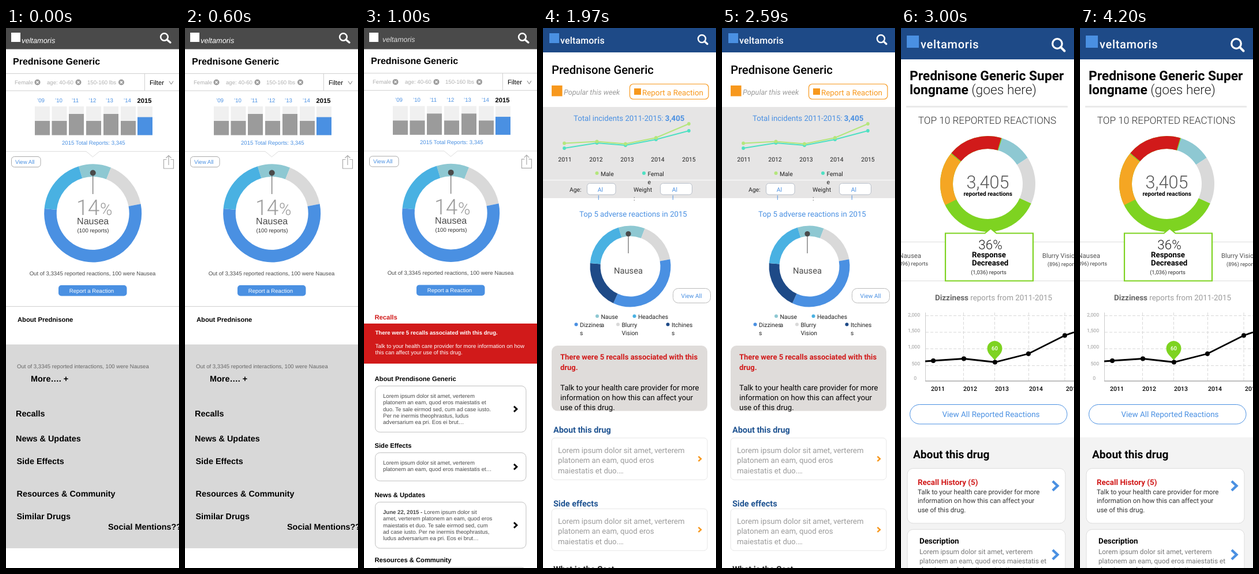
Animation of 300 by 930 pixels, one loop 5000 ms. Source, as an HTML page:

```html
<!DOCTYPE html>
<html lang="en">
<head>
<meta charset="utf-8">
<title>Drug report screens</title>
<style>
html, body { margin: 0; width: 100%; height: 100%; overflow: hidden; background: #fff; }
svg { display: block; width: 100vw; height: 100vh; }
text { text-rendering: geometricPrecision; white-space: pre; }
.arial { font-family: "Liberation Sans", Arial, sans-serif; }
.roboto { font-family: Roboto, sans-serif; }
</style>
</head>
<body>
<svg id="stage" viewBox="0 0 300 930"></svg>
<script>
const BLUE = '#4a90e2', SKY = '#49b1e2', TEAL = '#8ec8d2', LIGHT = '#d9d9d9', NAVY = '#1e4a87',
      GREY = '#9b9b9b', DARK = '#4a4a4a', RED = '#d11a1a', ORANGE = '#f7981d', GREEN = '#7ed321',
      LIME = '#b4e67c', MINT = '#4fe0c3';
const BRAND = 'veltamoris';

const attrs = o => Object.entries(o).map(([k, v]) => ` ${k}="${v}"`).join('');
const el = (name, o, body = '') => `<${name}${attrs(o)}>${body}</${name}>`;
const text = (x, y, s, size, fill = '#000', weight = 400, o = {}) =>
  el('text', { x, y, 'font-size': size, fill, 'font-weight': weight, ...o }, s.replace(/&/g, '&amp;'));
const mid = { 'text-anchor': 'middle' }, end = { 'text-anchor': 'end' };
const span = (s, weight, fill) => el('tspan', { 'font-weight': weight, fill }, s);
const lines = (x, ys, rows, size, fill, weight) =>
  rows.map((s, i) => text(x, ys[i], s, size, fill, weight)).join('');
// box given by its edges
const rect = (x, y, x2, y2, fill, rx = 0, stroke = 'none', sw = 1) =>
  el('rect', { x, y, width: x2 - x, height: y2 - y, fill, rx, stroke, 'stroke-width': sw });
const path = (d, stroke, sw = 1, o = {}) =>
  el('path', { d, stroke, 'stroke-width': sw, fill: 'none', ...o });
const dot = (cx, cy, r, fill) => el('circle', { cx, cy, r, fill });
const chevron = (x, y, w, h, color, sw) => path(`M${x} ${y - h}l${w} ${h}l${-w} ${h}`, color, sw);
const search = (x, y, r, x2, y2, sw) =>
  el('circle', { cx: x, cy: y, r, fill: 'none', stroke: '#fff', 'stroke-width': sw }) +
  path(`M${x + r * .7} ${y + r * .7}L${x2} ${y2}`, '#fff', sw + .8, { 'stroke-linecap': 'round' });

// parts: [start, end, colour], degrees clockwise from the top
function donut(cx, cy, outer, inner, parts) {
  const r = (outer + inner) / 2;
  const at = a => {
    const t = a * Math.PI / 180;
    return `${(cx + r * Math.sin(t)).toFixed(2)} ${(cy - r * Math.cos(t)).toFixed(2)}`;
  };
  return parts.map(([a, b, color]) =>
    path(`M${at(a)}A${r} ${r} 0 ${b - a > 180 ? 1 : 0} 1 ${at(b)}`, color, outer - inner)).join('');
}
const needle = (x, y, y2, r) => path(`M${x} ${y}V${y2}`, '#666', 1.2) + dot(x, y, r, DARK);

function darkHeader(x, y, size, fill) {
  return rect(0, 0, 300, 36.5, DARK) + rect(9, 8, 25, 24, '#fff') +
    text(x, y, BRAND, size, fill, 400, { 'font-style': 'italic' }) + search(274.5, 15.5, 6.3, 285, 25, 2.6);
}

// upper part common to the two grey screens
function summary() {
  const tag = (x, s, cx) => text(x, 97, s, 9.6, '#b0b0b0') + dot(cx, 93.5, 5, GREY) +
    path(`M${cx - 2} 91.5l4 4m0-4l-4 4`, '#fff', 1.3);
  const tops = [160, 160, 148, 160, 148, 160, 153.5];
  const lefts = [50, 79.5, 109, 139, 169, 199, 228];
  const labels = [60.5, 91.5, 120, 150, 179.5, 210.5];
  return text(12, 63, 'Prednisone Generic', 16, '#000', 700) +
    path('M0 78.5H300M0 108H300M240.5 78.5V108', '#d0d0d0') +
    tag(15, 'Female', 54.5) + tag(71, 'age: 40-60', 125.5) + tag(141, '150-160 lbs', 200) +
    text(249, 98, 'Filter', 11.2) + path('M283 91.5l3.5 5.5l3.5-5.5', '#777') +
    labels.map((x, i) => text(x, 128, '\u2019' + ['09', 10, 11, 12, 13, 14][i], 9.6, BLUE, 400, mid)).join('') +
    text(240, 129, '2015', 11.2, '#000', 700, mid) +
    lefts.map((x, i) => rect(x, 135, x + 26, 184.5, '#f0f0f0') +
      rect(x, tops[i], x + 26, 184.5, i < 6 ? GREY : BLUE)).join('') +
    text(97, 201, '2015 Total Reports: 3,345', 9.6, BLUE) +
    path('M0 212.5H139L150.5 222L162 212.5H300', '#ddd') +
    rect(9.5, 221.5, 60, 239.5, '#fff', 5, '#aaa') + text(16, 234, 'View All', 9.6, BLUE) +
    path('M278.5 226.5H273.5V242H290.5V226.5H285.5M282 236V219.5M277.5 224L282 219.5L286.5 224', '#aaa', 1.2) +
    donut(150.7, 319, 84.5, 63, [[-17, 21.8, TEAL], [21.8, 79, LIGHT], [79, 275.5, BLUE], [275.5, 343, SKY]]) +
    needle(150.7, 249.5, 286, 5) +
    text(122, 322, '14', 37, GREY, 300, { class: 'roboto', 'letter-spacing': -.8 }) +
    text(163, 322, '%', 29, GREY, 300, { class: 'roboto' }) +
    text(150.7, 338, 'Nausea', 16, DARK, 400, mid) +
    text(151, 351.5, '(100 reports)', 9.6, '#333', 400, mid) +
    text(150, 425.5, 'Out of 3,3345 reported reactions, 100 were Nausea', 9.6, DARK, 400, mid) +
    rect(91, 443, 209.5, 461.5, BLUE, 5) + text(148.5, 455.5, 'Report a Reaction', 9.6, '#fff', 400, mid);
}

function wireframe() {
  const heads = [[43, 609, 'More\u2026. +'], [17, 669, 'Recalls'], [17, 712, 'News & Updates'],
    [18.5, 751, 'Side Effects'], [18.5, 807, 'Resources & Community'], [18.5, 846, 'Similar Drugs'],
    [177, 863.5, 'Social Mentions??']];
  return darkHeader(27, 26, 12.8, '#fff') + summary() + path('M0 479.5H300', '#d0d0d0') +
    text(20, 506, 'About Prednisone', 11.2, '#000', 700) + rect(0, 545, 300, 896, '#d8d8d8') +
    text(19, 586, 'Out of 3,3345 reported interactions, 100 were Nausea', 9.6, '#666') +
    heads.map(([x, y, s]) => text(x, y, s, 14.4, '#000', 700)).join('');
}

function recallScreen() {
  const head = (y, s, fill) => text(18.5, y, s, 11.2, fill, 700);
  const card = (y, y2) => rect(19.5, y, 281, y2, '#fff', 8, '#c0c0c0') +
    (y < 920 ? chevron(260, (y + y2) / 2, 5, 4.6, '#000', 2.8) : '');
  const copy = (y, rows) => lines(33, rows.map((_, i) => y + i * 11.3), rows, 9.6, DARK);
  const date = text(33, 837, '', 9.6, DARK).replace('</text>',
    span('June 22, 2015 - ', 700, DARK) + 'Lorem ipsum dolor sit</text>');
  return darkHeader(32, 24, 12.4, '#ddd') + el('g', { transform: 'translate(0 -.6)' }, summary()) +
    head(502, 'Recalls', RED) + rect(0, 509, 300, 578, RED) +
    text(19.5, 528, 'There were 5 recalls associated with this drug.', 9.6, '#fff', 700) +
    lines(19.5, [550.5, 562], ['Talk to your health care provider for more information on how',
      'this can affect your use of this drug.'], 9.6, '#fff') +
    head(608, 'About Prendisone Generic') + card(616.5, 696) +
    copy(637, ['Lorem ipsum dolor sit amet, verterem', 'platonem an eam, quod eros maiestatis et',
      'duo. Te sale eirmod sed, cum ad case iusto.', 'Per ne inermis theophrastus, ludus',
      'adversarium ea pri. Eos ei brut\u2026']) +
    head(723, 'Side Effects') + card(731.5, 780) +
    copy(751.5, ['Lorem ipsum dolor sit amet, verterem', 'platonem an eam, quod eros maiestatis et\u2026']) +
    head(808, 'News & Updates') + card(816.5, 896) + date +
    copy(848.3, ['amet, verterem platonem an eam, quod eros', 'maiestatis et duo. Te sale eirmod sed, cum',
      'ad case iusto. Per ne inermis theophrastus,', 'ludus adversarium ea pri. Eos ei brut\u2026']) +
    head(920, 'Resources & Community') + card(929, 990);
}

function blueHeader(h, mark, x, y, size, spacing) {
  return rect(0, 0, 300, h, NAVY) + mark +
    text(x, y, BRAND, size, '#fff', 500, { 'letter-spacing': spacing });
}

function trendScreen() {
  const xs = [37, 93.5, 143, 196, 253];
  const series = (ys, color) => path('M' + xs.map((x, i) => x + ' ' + ys[i]).join('L'), color, 2) +
    xs.map((x, i) => dot(x, ys[i], 2.9, color)).join('');
  const key = (x, y, color, rows) => dot(x, y, 3, color) + lines(x + 6.4, [y + 4.7, y + 18.9], rows, 10.4, '#222');
  const pick = (x, x2, tx) => rect(x, 267.5, x2, 287, '#fff', 5, '#b8bfc9') +
    text(tx, 282, 'Al', 10.4, BLUE) + text(tx + .2, 296, 'l', 10.4, BLUE);
  const card = (y, title) => text(18, y - 9 + (y > 800 ? 5 : 0), title, 14.4, '#1f5391', 700) +
    rect(15, y, 285, y + 72, '#fff', 6, '#e6e6e6') +
    lines(26, [y + 26, y + 43.4, y + 60.8], ['Lorem ipsum dolor sit amet, verterem',
      'platonem an eam, quod eros', 'maiestatis et duo.\u2026'], 13.2, GREY) +
    chevron(269.5, y + 36, 4.5, 4.2, ORANGE, 2.5);
  return blueHeader(42, rect(11, 9, 28, 26, BLUE), 30, 27, 16, .15) + search(275.5, 18.5, 6.5, 285, 27.5, 2.5) +
    text(15, 78.5, 'Prednisone Generic', 20.2, '#000', 500) + rect(15, 99, 33.5, 117.5, ORANGE) +
    text(36, 115, 'Popular this week', 12.7, GREY, 400, { 'font-style': 'italic' }) +
    rect(150.5, 96.5, 287, 122.5, '#fff', 6, ORANGE, 1.2) + rect(158, 104, 170, 115, ORANGE) +
    text(172, 116, 'Report a Reaction', 13.4, ORANGE) +
    rect(0, 136, 300, 293, '#e6e5e5') + path('M0 262H300', '#fff', 1.2) +
    text(53, 160, '', 13.2, BLUE).replace('</text>', 'Total incidents 2011-2015: ' + span('3,405', 700, BLUE) + '</text>') +
    series([207, 198, 202, 192, 177], MINT) + series([198.5, 195.5, 199.5, 189, 165], LIME) +
    [38, 92, 146, 199, 253].map((x, i) => text(x, 230, String(2011 + i), 10.4, '#222', 400, mid)).join('') +
    key(93.5, 250, LIME, ['Male']) + key(175, 250, MINT, ['Femal', 'e']) +
    text(46, 281.5, 'Age:', 10.4, '#222') + pick(76.5, 126, 94.7) +
    lines(157, [282, 296.5], ['Weight', ':'], 10.4, '#222') + pick(203.5, 258.5, 223.7) +
    text(63, 324.5, 'Top 5 adverse reactions in 2015', 13.2, BLUE) +
    donut(151.5, 410.5, 70, 52, [[-17, 21, TEAL], [21, 80, LIGHT], [80, 205, BLUE], [205, 274.5, NAVY], [274.5, 343, SKY]]) +
    needle(148, 354.5, 388, 4.6) + text(148, 423, 'Nausea', 14.7, DARK, 400, mid) +
    rect(225.5, 448.5, 290.5, 473.5, '#fff', 9, '#bbb') + text(257.5, 465, 'View All', 10.2, BLUE, 400, mid) +
    key(94, 496.3, TEAL, ['Nause', 'a']) + key(158.5, 496.3, SKY, ['Headaches']) +
    key(57.5, 510.5, BLUE, ['Dizzines', 's']) + key(130, 510.5, LIGHT, ['Blurry', 'Vision']) +
    key(216.5, 510.5, NAVY, ['Itchines', 's']) +
    rect(15, 547, 285, 659.5, '#dfdcda', 10) +
    lines(30, [571, 588.5], ['There were 5 recalls associated with this', 'drug.'], 13, RED, 700) +
    lines(30, [623.5, 641, 658], ['Talk to your health care provider for more',
      'information on how this can affect your', 'use of this drug.'], 13.2, '#000') +
    card(706, 'About this drug') + card(828, 'Side effects') +
    text(18, 937, 'What is the Cost', 14.4, '#222', 700);
}

function reactionScreen() {
  const pts = [[56, 573], [109, 569.5], [163, 575.5], [221, 561], [284, 529.5]];
  const rows = [495.5, 524, 552.5, 581.5];
  const next = y => chevron(263, y, 8.5, 8, BLUE, 4.4);
  return blueHeader(54, rect(10, 13, 31, 34, BLUE), 34, 35, 20, .7) + search(271, 27, 8.3, 283.5, 39.5, 3.2) +
    text(15, 90, 'Prednisone Generic Super', 22.8, '#000', 700) +
    text(15, 113.5, '', 22.8, '#000').replace('</text>', span('longname', 700, '#000') + span(' (goes here)', 300, '#222') + '</text>') +
    path('M9 135.5H289', '#eaeaea', 3) +
    text(149.5, 164.5, 'TOP 10 REPORTED REACTIONS', 17.2, '#333', 300, mid) +
    donut(150.5, 268.5, 82.5, 60.5, [[114, 310, GREEN], [310, 378, GREEN], [-50, 16.4, RED], [17.4, 57, TEAL],
      [57, 114, LIGHT], [243.8, 308.8, '#f5a623']]) +
    text(150.5, 276, '3,405', 30.6, '#555', 300, mid) +
    text(150.7, 289, 'reported reactions', 10.2, '#000', 700, mid) +
    path('M0 368.5H300M0 435.5H300', '#ddd') +
    text(35, 396, 'Nausea', 11.4, '#555', 400, end) + text(47, 409, '(896) reports', 9.2, '#444', 400, end) +
    text(245, 396, 'Blurry Vision', 11.2, '#555') + text(254, 410, '(896) reports', 9.2, '#444') +
    path('M77 353.5H145.5L155.5 345.5L165.5 353.5H229V435.5H77Z', GREEN, 2.2, { fill: '#fff' }) +
    text(155, 380.5, '36%', 22.4, '#222', 300, mid) +
    lines(123, [395, 409], ['Response', 'Decreased'], 13.3, '#000', 700) +
    text(152, 424, '(1,036) reports', 9.4, '#333', 400, mid) +
    text(59, 469, '', 13.4, GREY).replace('</text>', span('Dizziness', 700, '#666') + ' reports from 2011-2015</text>') +
    path(rows.map(y => `M43 ${y}H300`).join('') + [108.5, 162.5, 221.5, 284].map(x => `M${x} 490V608`).join(''),
      '#d8d8d8', 1, { 'stroke-dasharray': '5 3' }) +
    path('M42.5 490V608', '#ccc') + path('M42 608H300', '#aaa', 1.4) +
    [['2,000', 497], ['1,500', 524], ['1,000', 552], ['500', 581]].map(([s, y]) => text(33, y, s, 8.6, GREY, 400, end)).join('') +
    text(27, 606, '0', 8.6, GREY, 400, end) +
    path('M42 574L' + pts.map(p => p.join(' ')).join('L') + 'L300 524', '#000', 2.8) +
    el('path', { d: 'M162.5 573C160 567 149.5 562 149.5 552A13 13 0 0 1 175.5 552C175.5 562 165 567 162.5 573Z', fill: GREEN }) +
    pts.map(p => dot(...p, 4, '#000')).join('') + text(162.5, 555.3, '60', 9.6, '#fff', 500, mid) +
    [52, 108, 163, 222, 286].map((x, i) => text(x, 625, String(2011 + i), 10.5, '#000', 500)).join('') +
    rect(15.5, 648.5, 288, 682, '#fff', 16.8, BLUE) +
    text(156, 669.5, 'View All Reported Reactions', 13.5, BLUE, 400, mid) +
    rect(0, 705, 300, 930, '#f3f3f3') + text(21, 740.5, 'About this drug', 19.1, '#000', 700) +
    rect(11, 758.5, 285, 853, '#fff', 10, '#ddd') + text(29, 787, 'Recall History (5)', 13.4, RED, 700) +
    lines(29, [803, 818.3, 833.5], ['Talk to your health care provider for more',
      'information on how this can affect your', 'use of this drug.'], 11.6, '#333') + next(788.5) +
    rect(11, 863.5, 285, 960, '#fff', 10, '#ddd') + text(32, 888, 'Description', 13.3, '#000', 700) +
    lines(32, [906, 921.5, 937], ['Lorem ipsum dolor sit amet, verterem',
      'platonem an eam, quod eros maiestatis et', 'duo. ipsum dolor sit amet, tation et ut'], 11.8, '#777') + next(907);
}

const LOOP = 5000;
const scenes = [[0, 'arial', wireframe], [1000, 'arial', recallScreen],
  [1970, 'roboto', trendScreen], [3000, 'roboto', reactionScreen]];
const stage = document.getElementById('stage');
stage.innerHTML = scenes.map(([, cls, draw]) => el('g', { class: cls }, draw())).join('');
const groups = [...stage.children];

function render(ms) {
  const t = ms % LOOP;
  const now = scenes.filter(s => s[0] <= t).length - 1;
  groups.forEach((g, i) => { g.style.display = i === now ? '' : 'none'; });
}
const start = performance.now();
function tick() {
  render(Math.max(0, performance.now() - start));
  requestAnimationFrame(tick);
}
tick();
</script>
</body>
</html>
```
